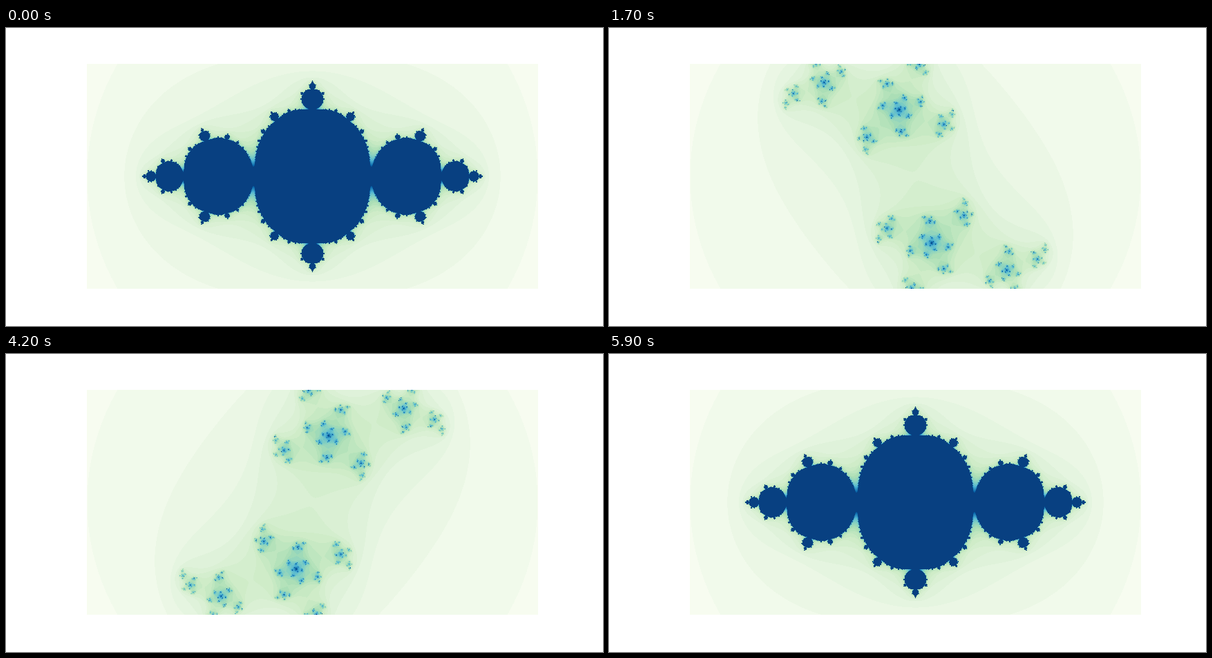
An HTML page with a canvas that plays this animation: 864 by 432 pixels, repeating every 6000 ms.

```html
<!DOCTYPE html>
<html lang="en">
<head>
<meta charset="utf-8">
<title>Julia sets</title>
<style>
  html, body { margin: 0; width: 100%; height: 100%; overflow: hidden; background: #fff; }
  canvas { display: block; width: 864px; height: 432px; }
</style>
</head>
<body>
<canvas id="stage" width="864" height="432"></canvas>
<script>
const LEFT = 117, TOP = 52, W = 653, H = 326;
const STEPS = 60, STEP_MS = 100;
const RADIUS = 0.7885, MAX_ITER = 30;
const STOPS = ['f7fcf0', 'e0f3db', 'ccebc5', 'a8ddb5', '7bccc4', '4eb3d3', '2b8cbe', '0868ac', '084081']
  .map(hex => [0, 2, 4].map(i => parseInt(hex.substr(i, 2), 16)));

const ctx = document.getElementById('stage').getContext('2d');
const image = ctx.createImageData(W, H);
const pixels = new Uint32Array(image.data.buffer);
const counts = new Uint8Array(W * H);

function colour(v) {
  const pos = Math.min(255, Math.floor(v * 256)) / 255 * (STOPS.length - 1);
  const i = Math.min(STOPS.length - 2, Math.floor(pos));
  const [r, g, b] = STOPS[i].map((a, k) => Math.round(a + (STOPS[i + 1][k] - a) * (pos - i)));
  return (255 << 24 | b << 16 | g << 8 | r) >>> 0;
}

function escapeTime(x, y, cx, cy) {
  let n = 0, xx = x * x, yy = y * y;
  while (n < MAX_ITER && xx + yy <= 4) {
    y = 2 * x * y + cy;
    x = xx - yy + cx;
    xx = x * x;
    yy = y * y;
    n++;
  }
  return n;
}

function draw(step) {
  const angle = -Math.PI + 2 * Math.PI * step / (STEPS - 1);
  const cx = RADIUS * Math.cos(angle), cy = RADIUS * Math.sin(angle);
  const last = W * H - 1;
  let top = 1;
  // z and -z escape together, so half the grid is enough
  for (let row = 0, i = 0; row < H / 2; row++) {
    const y = -1 + 2 * row / (H - 1);
    for (let col = 0; col < W; col++, i++) {
      const n = escapeTime(-2 + 4 * col / (W - 1), y, cx, cy);
      counts[i] = counts[last - i] = n;
      if (n > top) top = n;
    }
  }
  const palette = Array.from({ length: top + 1 }, (_, n) => colour(n / top));
  for (let i = 0; i <= last; i++) pixels[i] = palette[counts[i]];
  ctx.putImageData(image, LEFT, TOP);
}

let shown = -1;
function tick() {
  const step = Math.floor(performance.now() / STEP_MS) % STEPS;
  if (step !== shown) draw(shown = step);
  requestAnimationFrame(tick);
}
tick();
</script>
</body>
</html>
```
